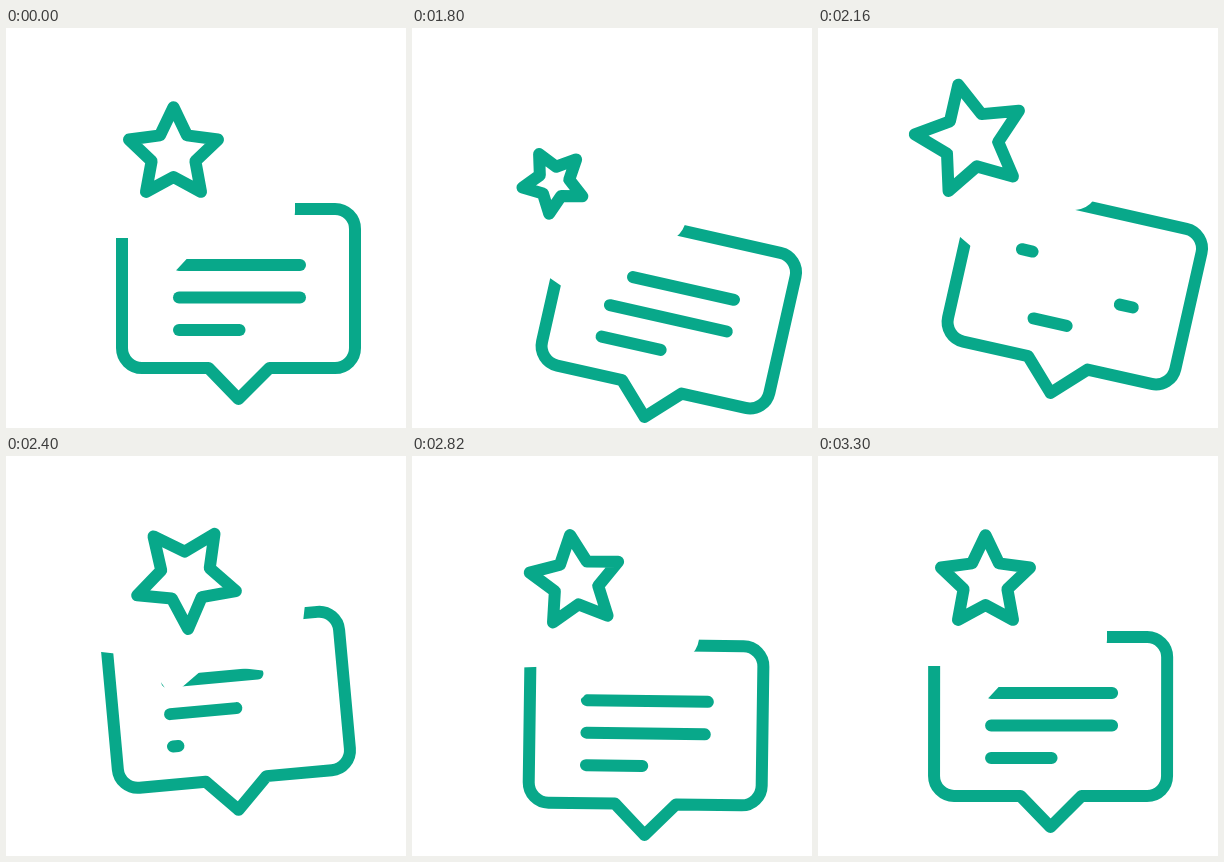
Recreate the animation shown at these times as an HTML page with a canvas. Size 400 by 400 pixels, loop 3.33 s.

```html
<!DOCTYPE html>
<html>
<head>
<meta charset="utf-8">
<style>
html, body { margin: 0; height: 100%; overflow: hidden; background: #fff; }
canvas { display: block; width: 100vw; height: 100vh; }
</style>
</head>
<body>
<canvas id="stage" width="400" height="400"></canvas>
<script>
const ctx = document.getElementById('stage').getContext('2d');
const GREEN = '#08a88a', LOOP = 3330, STEP = 30;

// Smooth curve through [time, value] points, flat at its extremes and ends.
function track(...p) {
  const sec = p.slice(1).map((b, i) => (b[1] - p[i][1]) / (b[0] - p[i][0]));
  const slope = p.map((_, i) => {
    const a = sec[i - 1] || 0, b = sec[i] || 0;
    return a * b > 0 ? 2 * a * b / (a + b) : 0;
  });
  return t => {
    if (t <= p[0][0]) return p[0][1];
    const i = p.findIndex(q => q[0] > t) - 1;
    if (i < 0) return p[p.length - 1][1];
    const d = p[i + 1][0] - p[i][0], u = (t - p[i][0]) / d, v = 1 - u;
    return v * v * (1 + 2 * u) * p[i][1] + u * u * (3 - 2 * u) * p[i + 1][1]
      + d * u * v * (v * slope[i] - u * slope[i + 1]);
  };
}

const back = {
  angle: track([1500, 0], [1800, 12.7], [1970, 15], [2160, 12.7], [2400, -5.2],
    [2480, -6.2], [2820, 0.8], [2960, 2.7], [3330, 0]),
  drop: track([1500, 0], [1800, 18], [1870, 19], [2040, 13], [2160, -6],
    [2370, -17.5], [2820, 8], [3120, 0])
};
const front = {
  angle: track([1500, 0], [1800, -13.6], [1930, -15], [2040, -13.5], [2160, -7.8],
    [2400, 6.5], [2430, 6.7], [2820, -2], [2860, -2.2], [3120, 0]),
  drop: track([1500, 0], [1800, 25.4], [1840, 26], [2040, 8], [2160, -15.4],
    [2220, -19], [2400, -5.7], [2600, 4], [2820, -0.5], [3000, 0])
};
const star = {
  spin: track([1500, 0], [1800, 58], [2160, 211], [2400, 315], [2820, 355], [3120, 360]),
  scale: track([1500, 1], [1800, 0.68], [1830, 0.67], [2040, 1.1], [2160, 1.2],
    [2200, 1.21], [2400, 1.11], [2820, 1])
};
const redraw = track([2130, 0], [2160, 0.09], [2280, 0.55], [2400, 0.75], [2580, 0.93], [2820, 1]);

const rad = deg => deg * Math.PI / 180;

// Run draw() with the origin at a bubble's tail tip.
function pose(x, y, part, t, draw) {
  ctx.save();
  ctx.translate(x, y + part.drop(t));
  ctx.rotate(rad(part.angle(t)));
  draw();
  ctx.restore();
}

function bubble(tip) {
  const w = 116.5, top = -190, low = -31, r = 20;
  ctx.beginPath();
  ctx.moveTo(0, tip);
  ctx.lineTo(-30, low);
  ctx.arcTo(-w, low, -w, top, r);
  ctx.arcTo(-w, top, w, top, r);
  ctx.arcTo(w, top, w, low, r);
  ctx.arcTo(w, low, 0, low, r);
  ctx.lineTo(31, low);
  ctx.closePath();
  ctx.stroke();
}

function textLine(y, length, t) {
  let from = 0, to = 1;
  if (t < 2100) from = (Math.max(0, t - 1638) / 426) ** 2;
  else to = redraw(t);
  if (from >= to) return;
  ctx.beginPath();
  ctx.moveTo(-59.5 + from * length, y);
  ctx.lineTo(-59.5 + to * length, y);
  ctx.stroke();
}

function drawStar(t) {
  ctx.translate(1, -109);
  ctx.rotate(rad(star.spin(t)));
  ctx.beginPath();
  for (let i = 0; i < 10; i++) {
    const r = (i % 2 ? 23 : 46.8) * star.scale(t), a = rad(i * 36);
    ctx.lineTo(r * Math.sin(a), -r * Math.cos(a));
  }
  ctx.closePath();
  ctx.stroke();
}

function frame(now) {
  const t = Math.floor(now % LOOP / STEP) * STEP;
  ctx.fillStyle = '#fff';
  ctx.fillRect(0, 0, 400, 400);
  ctx.lineWidth = 12;
  ctx.lineCap = ctx.lineJoin = 'round';
  ctx.strokeStyle = GREEN;
  pose(232.5, 371, back, t, () => {
    bubble(0);
    textLine(-134, 121, t);
    textLine(-101.5, 121, t - 120);
    textLine(-69, 60.5, t - 240);
  });
  pose(166.5, 235, front, t, () => {
    ctx.strokeStyle = '#fff';
    bubble(2.5);
    ctx.fill();
    ctx.strokeStyle = GREEN;
    drawStar(t);
  });
  requestAnimationFrame(() => frame(performance.now() - start));
}

const start = performance.now();
frame(0);
</script>
</body>
</html>
```
